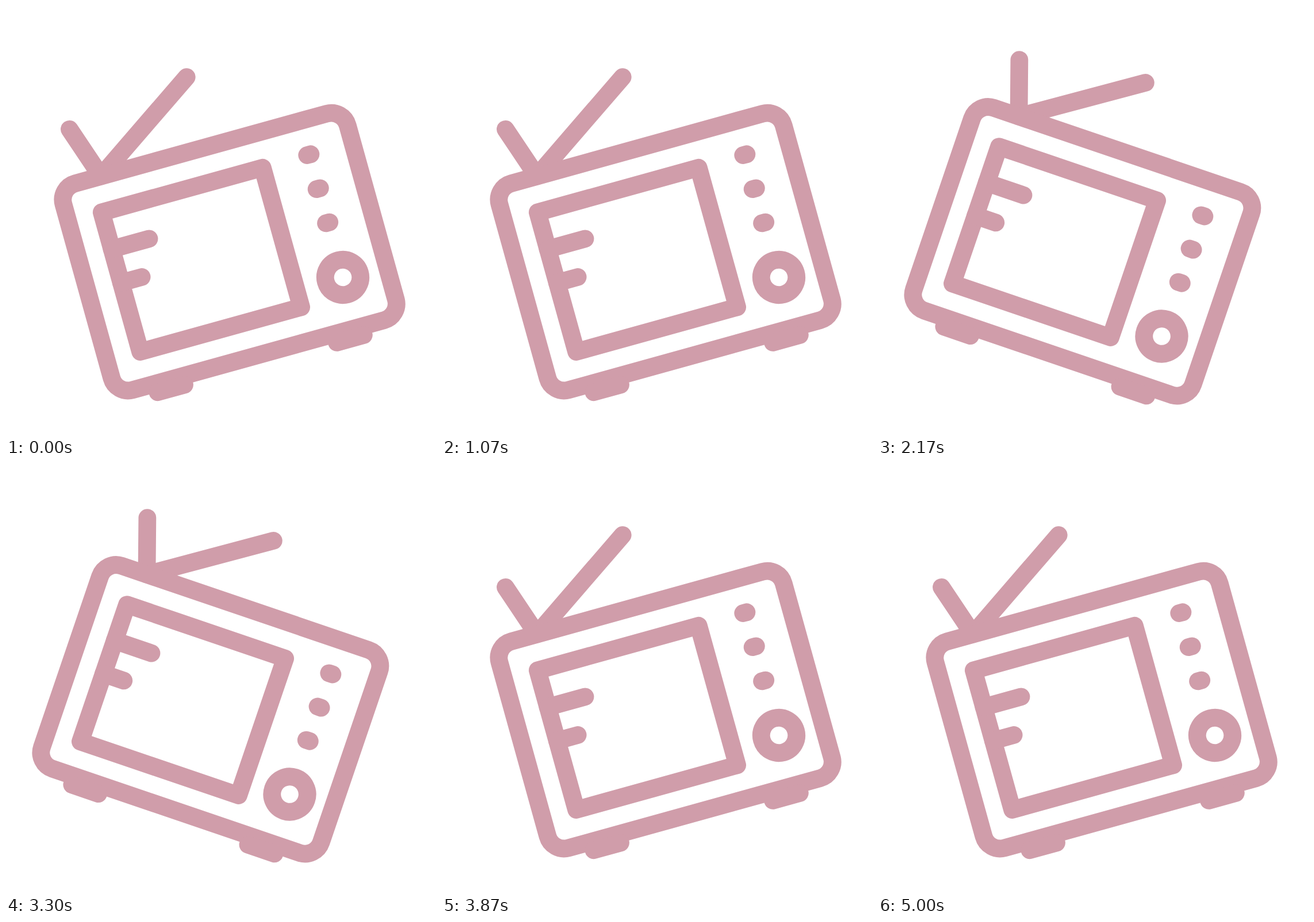
Animation, 748 px wide and 748 px high, one loop 5510 ms. Source, as an HTML page:

```html
<!DOCTYPE html>
<html lang="en">
<head>
<meta charset="utf-8">
<title>Rocking television</title>
<style>
  html, body { margin: 0; width: 100%; height: 100%; overflow: hidden; background: #fff; }
  svg { display: block; width: 100vw; height: 100vh; }
</style>
</head>
<body>
<svg viewBox="0 0 748 748">
  <!-- Local coordinates: the tuning knob is the origin. -->
  <g id="tv" fill="none" stroke="#d09daa" stroke-width="30.8" stroke-linecap="round" stroke-linejoin="round">
    <path id="antennas" d="M-389.4 -375.4L-358.5 -282L-168.8 -408.4"/>
    <rect id="body" x="-434.4" y="-281.9" width="513" height="372.9" rx="29.5"/>
    <path id="feet" d="M-363.8 106.4h48.4M-40.4 106.4h48.6"/>
    <path id="screen" d="M-374.2 -221.1H-83.6V30.6H-374.2Z"/>
    <path id="lines" d="M-374.2 -154.8H-306.8M-374.2 -94H-337"/>
    <path id="buttons" d="M-3.2 -221.4h6.4M-3.2 -160h6.4M-3.2 -98.6h6.4"/>
    <circle id="knob" r="30.7"/>
  </g>
</svg>
<script>
  const LOOP = 5510;
  const FLIPS = [570, 1070, 2170, 2730, 3300, 3870, 4400, 5000];
  const POSES = [
    "translate(586 472) rotate(-15.5)",
    "translate(493.5 574.5) rotate(18.8)"
  ];
  const tv = document.getElementById("tv");

  // The set snaps to the other side at each flip time.
  function draw(ms) {
    const flips = FLIPS.filter(t => ms >= t).length;
    tv.setAttribute("transform", POSES[flips % 2]);
  }

  const start = performance.now();
  function tick() {
    draw((performance.now() - start) % LOOP);
    requestAnimationFrame(tick);
  }
  draw(0);
  requestAnimationFrame(tick);
</script>
</body>
</html>
```
